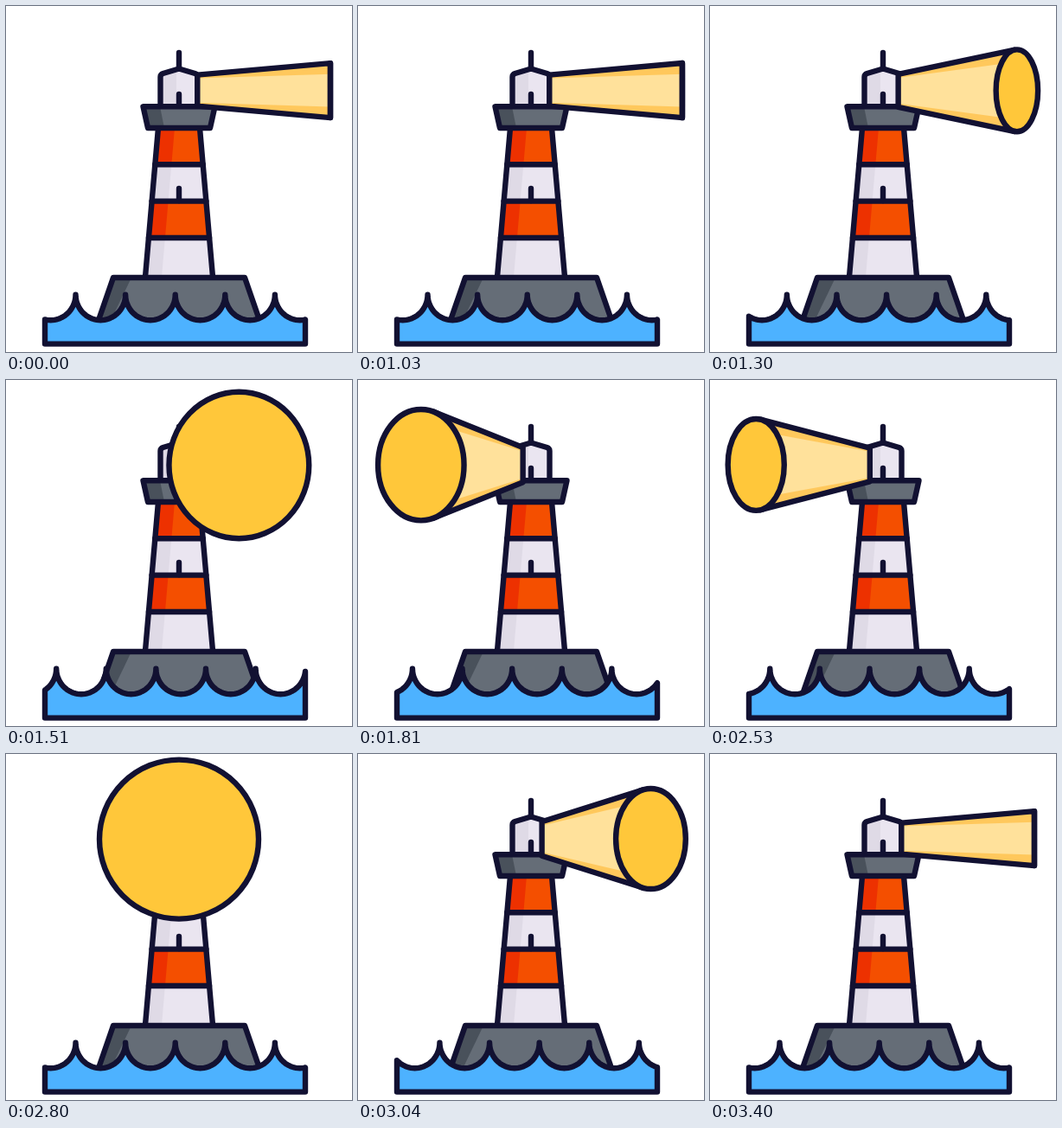
Write an HTML page with a canvas that moves like this. It is 400 px wide and 400 px high and loops after 3430 ms.

```html
<!DOCTYPE html>
<html lang="en">
<head>
<meta charset="utf-8">
<title>Lighthouse</title>
<style>
  html, body { margin: 0; width: 100%; height: 100%; overflow: hidden; background: #fff; }
  canvas { display: block; width: 400px; height: 400px; }
</style>
</head>
<body>
<canvas id="stage"></canvas>
<script>
const canvas = document.getElementById('stage');
const ctx = canvas.getContext('2d');
const ratio = window.devicePixelRatio || 1;
canvas.width = canvas.height = 400 * ratio;

const LOOP = 3430, REST = 1030, STEP = 30;
const SWING_START = 1009, SWING_TURN = 2200, SWING_END = 3400;
const INK = '#121132', WHITE = '#eae5f0', WHITE_SHADE = '#dfdae6';
const RED = '#f44f00', RED_SHADE = '#ed3100';
const STONE = '#656d77', STONE_SHADE = '#49515b';
const WATER = '#4db2ff', LAMP = '#ffc73a', GLOW = '#ffc85c', GLOW_CORE = '#ffe19b';
const WAVE = 57.6;

const smooth = u => u * u * (3 - 2 * u);

// Symmetric cubic-bezier(.62, 0, .38, 1)
function ease(x) {
  if (x <= 0) return 0;
  if (x >= 1) return 1;
  let lo = 0, hi = 1;
  for (let i = 0; i < 24; i++) {
    const u = (lo + hi) / 2, v = 1 - u;
    if (1.86 * u * v * v + 1.14 * u * u * v + u * u * u < x) lo = u; else hi = u;
  }
  return smooth(lo);
}

function swing(t) {
  return t < SWING_TURN
    ? ease((t - SWING_START) / (SWING_TURN - SWING_START))
    : 1 - ease((t - SWING_TURN) / (SWING_END - SWING_TURN));
}

function trace(points, close = true) {
  ctx.beginPath();
  points.forEach(([x, y]) => ctx.lineTo(x, y));
  if (close) ctx.closePath();
}

function fill(points, color) {
  trace(points);
  ctx.fillStyle = color;
  ctx.fill();
}

function outline(points, close = true) {
  trace(points, close);
  ctx.stroke();
}

const line = (x1, y1, x2, y2) => outline([[x1, y1], [x2, y2]], false);

function drawBase() {
  const shape = [[124, 314], [276, 314], [294, 366], [106, 366]];
  fill(shape, STONE);
  fill([[124, 314], [145, 314], [120, 366], [106, 366]], STONE_SHADE);
  outline(shape);
}

function drawTower() {
  const slope = 15 / 172;
  const left = y => 176 - (y - 141) * slope;
  const right = y => 400 - left(y);
  const shade = y => left(y) + 19;
  const levels = [141, 183.3, 225.6, 268, 313];
  for (let i = 0; i < 4; i++) {
    const a = levels[i], b = levels[i + 1], red = i % 2 === 0;
    fill([[left(a), a], [right(a), a], [right(b), b], [left(b), b]], red ? RED : WHITE);
    fill([[left(a), a], [shade(a), a], [shade(b), b], [left(b), b]], red ? RED_SHADE : WHITE_SHADE);
  }
  line(200, 211, 200, 225);
  levels.slice(1, 4).forEach(y => line(left(y), y, right(y), y));
  line(left(141), 141, left(313), 313);
  line(right(141), 141, right(313), 313);
}

function headPath() {
  ctx.beginPath();
  ctx.moveTo(178.5, 116);
  ctx.lineTo(178.5, 82);
  ctx.quadraticCurveTo(178.5, 79, 181.5, 78);
  ctx.lineTo(200, 72.5);
  ctx.lineTo(218.5, 78);
  ctx.quadraticCurveTo(221.5, 79, 221.5, 82);
  ctx.lineTo(221.5, 116);
}

function drawHead() {
  line(200, 54, 200, 72);
  headPath();
  ctx.fillStyle = WHITE;
  ctx.fill();
  fill([[179, 116], [179, 80], [197, 74], [197, 116]], WHITE_SHADE);
  headPath();
  ctx.stroke();
  line(200, 102, 200, 116);
  const gallery = [[158.5, 116.3], [241.5, 116.3], [236, 141], [164, 141]];
  fill(gallery, STONE);
  fill([[158.5, 116.3], [178, 116.3], [183, 141], [164, 141]], STONE_SHADE);
  outline(gallery);
}

function drawWater(shift) {
  const L = 45, R = 346, top = 333.6, depth = 29.6, bottom = 390.6, half = WAVE / 2;
  const first = 80.5 + shift % WAVE - 2 * WAVE + half;
  const edge = x => {
    const d = (((x - first + half) % WAVE + WAVE) % WAVE - half) / half;
    return [x, top + depth * Math.sqrt(1 - d * d)];
  };
  const points = [edge(L)];
  for (let c = first; c < R + WAVE; c += WAVE) {
    for (let i = 0; i <= 40; i++) {
      const a = Math.PI * (1 - i / 40), x = c + half * Math.cos(a);
      if (x > L && x < R) points.push([x, top + depth * Math.sin(a)]);
    }
  }
  points.push(edge(R), [R, bottom], [L, bottom]);
  fill(points, WATER);
  outline(points);
}

function drawBeam(e) {
  const u = 1 - 2 * e;
  const turn = u + 0.18 * u ** 3 * (1 - u * u);
  const facing = 1 - 0.725 * turn ** 2 - 0.275 * turn ** 4;
  const cx = 200 + 175 * turn, cy = 97.6 + facing;
  const rx = Math.max(0.01, 92 * facing), ry = 31.5 + 60.5 * facing;
  const rootX = 200 + 21.3 * Math.sign(turn) * smooth(1 - facing);
  const rootH = 18 + 4 * facing;

  // Tangent point on the lens ellipse for a corner of the lamp
  const tangent = side => {
    const px = (rootX - cx) / rx, py = side * rootH / ry;
    const d = Math.hypot(px, py);
    if (d <= 1) return null;
    const spread = Math.acos(1 / d) * side * Math.sign(px);
    const a = Math.atan2(py, px) + spread;
    return [cx + rx * Math.cos(a), cy + ry * Math.sin(a)];
  };
  const upper = tangent(-1), lower = tangent(1);
  if (upper && lower) {
    const cone = [[rootX, cy - rootH], upper, lower, [rootX, cy + rootH]];
    const inner = ry * (0.6 + 0.4 * facing), innerRoot = rootH * 0.78;
    fill(cone, GLOW);
    ctx.save();
    trace(cone);
    ctx.clip();
    fill([[rootX, cy - innerRoot], [cx, cy - inner], [cx, cy + inner], [rootX, cy + innerRoot]], GLOW_CORE);
    ctx.restore();
    outline(cone);
  }
  ctx.beginPath();
  ctx.ellipse(cx, cy, rx, ry, 0, 0, Math.PI * 2);
  ctx.fillStyle = LAMP;
  ctx.fill();
  ctx.stroke();
}

function draw(t) {
  ctx.setTransform(ratio, 0, 0, ratio, 0, 0);
  ctx.fillStyle = '#fff';
  ctx.fillRect(0, 0, 400, 400);
  ctx.strokeStyle = INK;
  ctx.lineWidth = 6.4;
  ctx.lineCap = ctx.lineJoin = 'round';
  const e = swing(t);
  drawTower();
  drawBase();
  drawHead();
  drawWater(2 * WAVE * e);
  drawBeam(e);
}

function frame() {
  const t = performance.now() % LOOP;
  draw(t < REST ? 0 : REST + STEP * Math.floor((t - REST) / STEP));
  requestAnimationFrame(frame);
}
frame();
</script>
</body>
</html>
```
